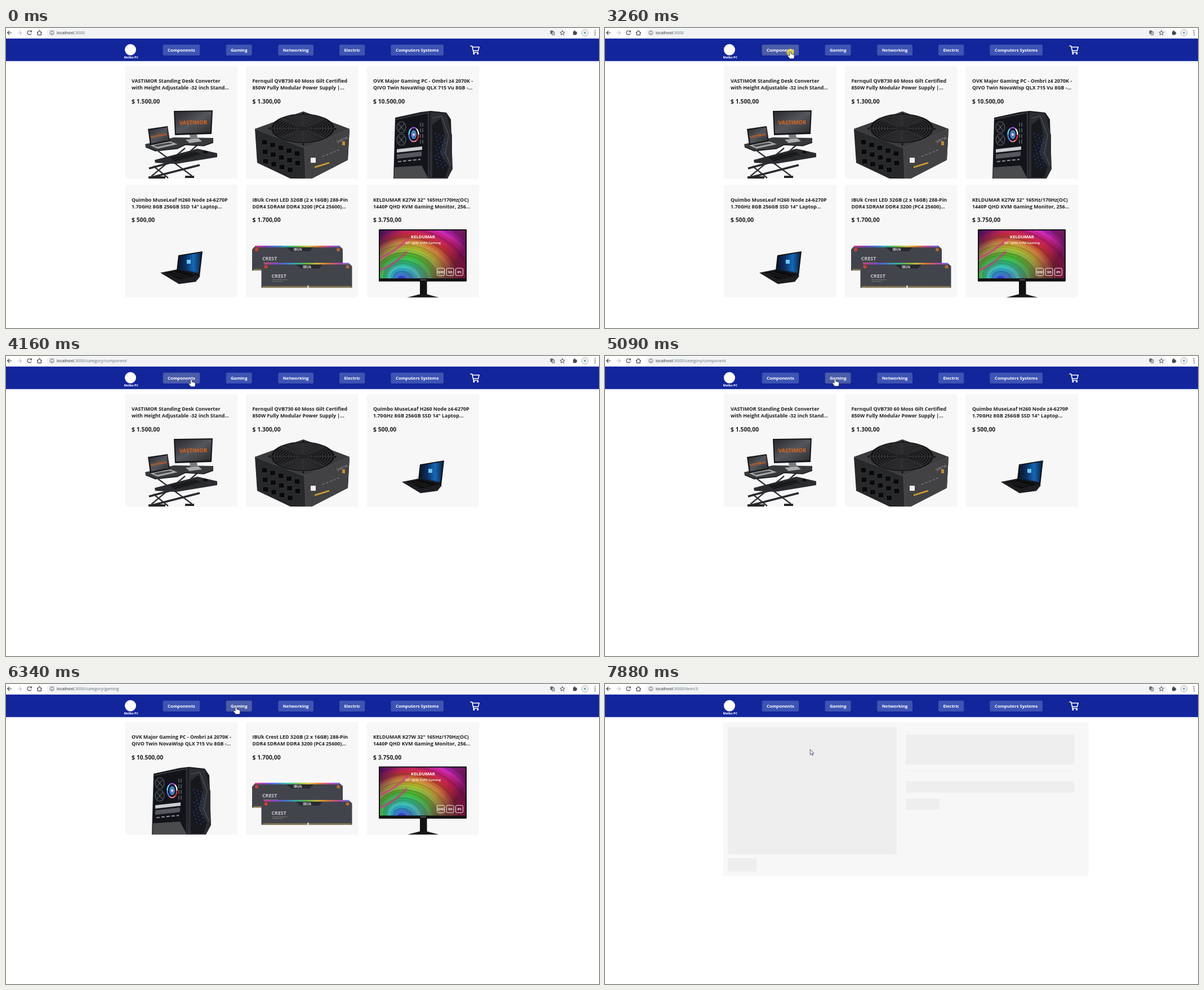
These frames come from a looping animation (1053x532 px, 8 s). An HTML page:

```html
<!DOCTYPE html>
<html lang="en">
<head>
<meta charset="utf-8">
<title>Shop demo</title>
<style>
html, body { margin: 0; width: 100%; height: 100%; overflow: hidden; background: #fff }
#stage { display: block; width: 1053px; height: 532px; font-family: "Open Sans", sans-serif }
.hover { filter: drop-shadow(0 1.5px 1.5px rgba(0, 0, 0, .2)) }
</style>
</head>
<body>
<svg id="stage" viewBox="0 0 1053 532"></svg>
<script>
const LOOP = 8000, SIZE = 199.5;
const stage = document.getElementById('stage');

// Markup helpers
const rect = (x, y, w, h, fill, r = 0, more = '') =>
  `<rect x="${x}" y="${y}" width="${w}" height="${h}" rx="${r}" fill="${fill}" ${more}/>`;
const shape = (d, fill, more = '') => `<path d="${d}" fill="${fill}" ${more}/>`;
const line = (d, color, w = 1, more = '') =>
  `<path d="${d}" fill="none" stroke="${color}" stroke-width="${w}" ${more}/>`;
const dot = (x, y, rx, fill, ry = rx, more = '') =>
  `<ellipse cx="${x}" cy="${y}" rx="${rx}" ry="${ry}" fill="${fill}" ${more}/>`;
const text = (x, y, s, size, fill, more = '') =>
  `<text x="${x}" y="${y}" font-size="${size}" fill="${fill}" ${more}>${s}</text>`;
const repeat = (n, f) => Array.from({ length: n }, (_, i) => f(i)).join('');
const gradient = (id, stops, more = '') => `<linearGradient id="${id}" ${more}>` +
  stops.map((c, i) => `<stop offset="${i / (stops.length - 1)}" stop-color="${c}"/>`).join('') +
  '</linearGradient>';
const bold = 'font-weight="700"', mid = 'text-anchor="middle"';

// Product pictures, each drawn where it sits on the home page
function desk() {
  const orange = '#e0651f', steel = '#333438';
  return line('M258 263L318 213M270 218L330 262M262 245L288 266M345 203L304 239', steel, 2.4) +
    line('M254 249L302 236M258 265L344 243', '#28292d', 3.6) +
    line('M253 265H283M318 264H334', '#242528', 4) +
    shape('M247 206L298 194L368 195V203L351 209L318 207L304 214L265 218L248 211Z', '#38393d') +
    line('M248 211L265 218L304 214L318 207L351 209L368 203', '#18191b', 1.5) +
    shape('M264 234L340 214L375 222V229L302 241L265 239Z', '#2b2c30') +
    shape('M290 229L336 219L346 224L300 236Z', '#111214') +
    line('M294 230L339 220M298 233L343 223', '#43454a', .7) +
    dot(354, 220, 4, '#0e0e10', 2.2) +
    shape('M326 189H339L341 200H328Z', '#77797c') + shape('M319 198L342 196L348 201L326 204Z', '#a9abad') +
    shape('M298 147L367 146L365 188L300 190Z', '#131417') +
    shape('M300 149L365 148L363 185L302 187Z', 'url(#slate)') +
    text(332.5, 171, 'VASTIMOR', 9.6, orange, `${bold} ${mid} transform="rotate(-1 332 170)"`) +
    shape('M252 179L287 174L291 201L256 208Z', '#131417') +
    shape('M254 181L286 176L289 199L258 205Z', 'url(#slate)') +
    text(271, 193, 'VASTIMOR', 5.6, orange, `${bold} ${mid} transform="rotate(-10 271 191)"`) +
    shape('M256 208L291 201L305 206L269 214Z', '#aaabad') + shape('M262 208L290 203L297 205L268 211Z', '#4a4b4e');
}

function powerSupply() {
  return shape('M442 179L528 148L610 179L607 234L543 267H505L446 239Z', '#27282a') +
    shape('M442 179L528 148L610 179L530 213Z', '#3a3b3d') +
    shape('M530 213L610 179L607 234L543 267H532Z', '#424244') +
    line('M442 179L530 213L610 179M530 213L532 267', '#555659', .8) +
    dot(527, 178, 56, '#161618', 26) +
    repeat(10, i => dot(527, 178, 6 + i * 5, 'none', 2.6 + i * 2.3, 'stroke="#4c4d50" stroke-width=".9"')) +
    line('M472 178H582M527 153V203M488 160L566 196M566 160L488 196', '#3d3e40', .9) +
    dot(527, 178, 9, '#222325', 4) +
    [[468, 178], [528, 152], [585, 179], [528, 206]].map(p => dot(...p, 1.8, '#0d0d0e')).join('') +
    repeat(14, i => {
      const row = i / 5 | 0, col = i % 5;
      return rect(454 + col * 14.5 + row, 198 + row * 17 + col * 5, 10, 9, '#09090a', 1,
        'stroke="#48494b" stroke-width=".6"');
    }) +
    text(588, 204, 'QVB730', 5.6, '#aaa', 'transform="rotate(-22 588 204)"') +
    rect(597, 201, 5, 7, '#c08b34') + rect(541, 230, 9, 9, '#eee') +
    line('M548 247L574 239', '#d3a02d', 2.6) + line('M562 228L592 216', '#999', 1, 'stroke-dasharray="4 3"');
}

function tower() {
  const ring = ['#e33', '#e8a', '#48f', '#6df', '#a5f', '#fff'];
  return shape('M691 159L737 149L754 147L782 150L790 162L793 250L784 267H688Z', '#1b1c20') +
    shape('M693 162L748 152L750 267H690Z', '#13141a') +
    shape('M754 149L782 152L792 190V250L783 267H752Z', '#2b2d33') +
    shape('M757 172L772 160L779 190L771 222L786 246L780 265H757Z', '#17181c') +
    line('M757 160L773 156L786 190L780 222L790 244', '#50535b', 1.2) +
    repeat(30, i => dot(762 + i * 7 % 19, 187 + i * 2.1, .9, '#2852d8')) +
    [176, 198].map(y => dot(702, y, 8, '#17191f', 10, 'stroke="#555b66" stroke-width="1.2"') +
      line(`M697 ${y - 6}L707 ${y + 6}M707 ${y - 6}L697 ${y + 6}`, '#777', 1)).join('') +
    line('M736 168V205M740 168V205', '#85898f', 1, 'stroke-dasharray="7 3"') +
    ring.map((c, i) => dot(724, 189, 8.5, 'none', 12.5,
      `stroke="${c}" stroke-width="2.2" pathLength="6" stroke-dasharray="1 5" stroke-dashoffset="${-i}"`)).join('') +
    dot(724, 189, 5, '#487bbd', 8) + dot(724, 189, 2.2, '#dce') +
    shape('M694 215L739 210V216L694 221Z', '#c9ccd0') + shape('M694 224L738 219V227L694 232Z', '#55585e') +
    line('M696 237L736 233', '#8d9198', 2, 'stroke-dasharray="6 3"') +
    shape('M690 247L738 244L750 267H689Z', '#4a4b4d') +
    line('M692 162L750 150V267', '#3b3d43', 1.4);
}

function laptop() {
  return shape('M274 434L304 428L345 440L337 450L307 454Z', '#1d1e21') +
    shape('M284 434L306 430L337 439L309 446Z', '#0c0c0e') +
    line('M288 435L318 443M295 433L325 441', '#37383c', .8) +
    shape('M306 403L349 396L344 440L303 430Z', '#101114') +
    shape('M308 405L347 398L342 436L305 428Z', 'url(#screen)') +
    rect(321, 411, 7, 7, '#6cc8f2') + line('M305 427L342 435', '#132338', 1.4);
}

function stick(x, y) {
  return shape(`M${x + 4} ${y + 2}H${x + 157}L${x + 161} ${y + 6}V${y + 44}H${x}V${y + 7}Z`, '#42444c') +
    shape(`M${x + 60} ${y + 2}H${x + 110}L${x + 102} ${y + 10}H${x + 70}Z`, '#282930') +
    rect(x + 5, y, 151, 2.8, 'url(#rainbow)') +
    line(`M${x + 3} ${y + 42.5}H${x + 159}`, '#b89a54', 2.4, 'stroke-dasharray="1.5 1"') +
    rect(x + 82, y + 40, 2, 5, '#f7f7f7') +
    dot(x + 8, y + 7, 3, '#d33d33') + dot(x + 153, y + 7, 3, '#b56835') +
    text(x + 81, y + 9, 'IBUk', 6.4, '#ddd', `${bold} ${mid}`) +
    text(x + 18, y + 26, 'CREST', 8.8, '#c4c5c8', bold) +
    line(`M${x + 20} ${y + 30}h26m-26 3h18`, '#888', 1, 'stroke-dasharray="3 1"');
}
const memory = () => stick(437, 386) + stick(453.5, 416.5);

function monitor() {
  const badge = (x, s) => rect(x, 426, 13, 13, 'none', 2, 'stroke="#fff" stroke-width=".9"') +
    text(x + 6.5, 434.5, s, 5, '#fff', `${bold} ${mid}`);
  // Bands fan out from the lower left: blue inside, then green, yellow, red and purple
  const bands = repeat(22, i => dot(702 + i, 446 - i * .6, 6 + i * 5.4, 'none', 5 + i * 4.3,
    `stroke="hsl(${225 - i * 14} 72% ${48 + 7 * Math.sin(i * 2)}%)" stroke-width="6.5" opacity=".8"`));
  return rect(735, 448, 12.5, 26, '#111') + shape('M735 472H747L769 478H712Z', '#17181a') +
    rect(662, 357, 156, 92.5, '#111214', 1) +
    '<svg x="664" y="359" width="152" height="85" viewBox="664 359 152 85">' +
    rect(664, 359, 152, 85, '#6b1c78') +
    `<g transform="rotate(14 702 446)">${bands}</g>` +
    rect(664, 359, 152, 85, 'url(#dusk)') +
    line('M664 408Q692 396 716 372M664 430Q690 420 712 396', '#d62f8c', 4, 'opacity=".6"') + '</svg>' +
    text(740.5, 373, 'KELDUMAR', 7.7, '#fff', `${bold} ${mid}`) +
    text(740.5, 382.5, '32&quot; QHD KVM Gaming', 6, '#fff', `font-weight="600" ${mid}`) +
    badge(765.5, 'QHD') + badge(782, '165') + badge(798.5, 'IPS') + rect(736, 446, 10, 1.2, '#777');
}

const products = [
  ['VASTIMOR Standing Desk Converter', 'with Height Adjustable -32 inch Stand...', '1.500,00', desk],
  ['Fernquil QVB730 60 Moss Gilt Certified', '850W Fully Modular Power Supply |...', '1.300,00', powerSupply],
  ['OVK Major Gaming PC - Ombri z4 2070K -', 'QIVO Twin NovaWisp QLX 715 Vu 8GB -...', '10.500,00', tower],
  ['Quimbo MuseLeaf H260 Node z4-6270P', '1.70GHz 8GB 256GB SSD 14&quot; Laptop...', '500,00', laptop],
  ['IBUk Crest LED 32GB (2 x 16GB) 288-Pin', 'DDR4 SDRAM DDR4 3200 (PC4 25600)...', '1.700,00', memory],
  ['KELDUMAR K27W 32&quot; 165Hz/170Hz(OC)', '1440P QHD KVM Gaming Monitor, 256...', '3.750,00', monitor]
];

const cardX = i => 211.5 + i % 3 * 214.5;
const cardY = i => i < 3 ? 67.5 : 278.3;

function card(id, slot) {
  const [first, second, price, draw] = products[id], x = cardX(slot), y = cardY(slot);
  return rect(x, y, SIZE, SIZE, '#f7f7f7', 2.5, 'class="card"') +
    text(x + 11.5, y + 29.2, first, 8.85, '#212121', bold) +
    text(x + 11.5, y + 41.5, second, 8.85, '#212121', bold) +
    text(x + 11.5, y + 66, '$ ' + price, 10.4, '#212121', bold) +
    `<svg x="${x}" y="${y}" width="${SIZE}" height="${SIZE}" viewBox="${cardX(id)} ${cardY(id)} ${SIZE} ${SIZE}">${draw()}</svg>`;
}

const grey = (x, y, w, h) => rect(x, y, w, h, '#eee', 1.5);
const blank = i => {
  const x = cardX(i), y = cardY(i);
  return rect(x, y, SIZE, SIZE, '#f7f7f7', 2.5) + grey(x + 11.5, y + 21.8, 177, 20) +
    grey(x + 11.5, y + 54.5, 71, 17.3) + grey(x + 11.5, y + 84, 177, 115.5);
};

const pages = {
  home: [0, 1, 2, 3, 4, 5].map(card).join(''),
  component: [0, 1, 3].map(card).join(''),
  gaming: [2, 4, 5].map(card).join(''),
  loading: repeat(6, blank),
  item: rect(210, 68, 648.5, 272.7, '#f7f7f7', 3) + grey(218.3, 77.5, 299.7, 224.5) + grey(534, 89.7, 299.5, 53) +
    rect(534, 153.6, 299.5, .8, '#e8e8e8') + grey(534, 172.4, 299.5, 20) + grey(534, 203, 60, 20) +
    grey(218.3, 309, 50.6, 23.4)
};

const buttons = [
  ['Components', 278.7, 65.5], ['Gaming', 390.7, 46], ['Networking', 483.3, 62.7],
  ['Electric', 592, 45.3], ['Computers Systems', 683.3, 93.7]
];

function browserBar() {
  const ink = '#45484c';
  return line('M10 8.5H2.8M6.2 5L2.7 8.5L6.2 12', ink, 1.2) +
    line('M20 8.5H27.2M23.8 5L27.3 8.5L23.8 12', '#c4c6c9', 1.2) +
    line('M44.5 6.2A3.6 3.6 0 1 0 45 9.6M45.3 4V7H42.2', ink, 1.2) +
    line('M55 8.8L59.3 4.6L63.6 8.8M56.3 8V12.4H62.3V8', ink, 1.2) +
    rect(72, 1, 926, 15, '#f1f3f4', 7.5) +
    dot(81.5, 8.5, 3.6, 'none', 3.6, `stroke="${ink}" stroke-width=".8"`) + line('M81.5 8V10.6M81.5 6.2V7.1', ink, .9) +
    `<text x="90" y="11.1" font-size="7.4" fill="#202124">localhost<tspan fill="#5f6b80">:3000<tspan id="path"></tspan></tspan></text>` +
    rect(966.5, 4.5, 5, 6, '#5f6368', .7) + rect(969.5, 6.5, 4.5, 6, '#b9bcc0', .7, `stroke="${ink}" stroke-width=".6"`) +
    line('M988 4.4L989.2 7.2L992.2 7.4L989.9 9.3L990.6 12.2L988 10.6L985.4 12.2L986.1 9.3L983.8 7.4L986.8 7.2Z', ink, .9) +
    rect(1007, 6.2, 6, 6, ink, .8) + dot(1009.6, 5.8, 1.4, ink) + dot(1013, 9, 1.4, ink) +
    dot(1028, 8.5, 5.7, '#f6f8f8', 5.7, 'stroke="#8a9296" stroke-width=".8"') + dot(1028, 8.5, 2, '#7fa3b0') +
    [5, 8.5, 12].map(y => dot(1046, y, .9, ink)).join('');
}

const navBar = () => rect(0, 18.7, 1053, 40, '#12259b') +
  dot(221, 38.5, 10, '#fff') + text(222.3, 54, 'Melbo PC', 5.6, '#fff', `${bold} ${mid}`) +
  buttons.map(([label, x, w]) => rect(x, 29.5, w, 19.2, '#3d54b3', 2.2, 'class="button"') +
    text(x + w / 2, 42.1, label, 7.72, '#fff', `${bold} ${mid}`)).join('') +
  line('M824.8 31.7H827.6L830.3 43.2H838.6M828.2 33.8H840.2L838.4 40.2H829.6', '#fff', 1.6,
    'stroke-linejoin="round" stroke-linecap="round"') +
  dot(830.9, 45.5, 1.6, '#fff') + dot(837.7, 45.5, 1.6, '#fff');

stage.innerHTML = '<defs>' +
  gradient('slate', ['#29292d', '#55565b', '#2b2b2f'], 'x2="1" y2="1"') +
  gradient('screen', ['#0a1424', '#0b2f63', '#1668b5', '#0a2346']) +
  gradient('rainbow', ['#d9407a', '#8a45c8', '#4576dd', '#35b7b0', '#6cc04b', '#d8c23c', '#e07a34', '#c946a8', '#5568d8']) +
  gradient('dusk', ['#1a0d45d0', '#64106430', '#c92b6200', '#b0184830', '#4a0a34b0'], 'x2="1" y2=".35"') + '</defs>' +
  Object.entries(pages).map(([name, body]) => `<g id="${name}">${body}</g>`).join('') +
  browserBar() + navBar() +
  '<g id="cursor">' + dot(0, 2, 6.5, '#f5e02f', 6.5, 'id="click" opacity=".78"') +
  shape('M0 0V9.6L2.2 7.6L3.7 11L5.3 10.3L3.8 7.1H6.8Z', '#fff', 'id="arrow" stroke="#2b2b5c" stroke-width=".8"') +
  shape('M-1.4 7.6V1.2Q0-.8 1.4 1.2V4.6Q2.8 4 3.6 5.2Q5 4.6 5.6 5.9Q7.2 5.5 7.2 7.2V9.5Q7 11.5 6 13H-.8Q-2.5 10.5-4.6 8.2Q-4.6 6.2-2.8 6.8Z',
    '#fff', 'id="hand" stroke="#26262c" stroke-width=".8"') + '</g>';

const el = id => document.getElementById(id);
const show = (id, on) => { el(id).style.display = on ? '' : 'none'; };

const views = [
  [0, 'home', ''], [3330, 'loading', '/category/component'], [4160, 'component', '/category/component'],
  [5430, 'loading', '/category/gaming'], [6340, 'gaming', '/category/gaming'], [7810, 'item', '/item/3']
];
// start, end, steps, target x, y, optional curve control x, y
const moves = [
  [440, 580, 3, 1036, 525], [840, 1240, 7, 599, 502, 830, 388], [1510, 1650, 3, 576, 429],
  [2000, 2760, 12, 329, 41.5], [4750, 5090, 6, 408.5, 40.5], [6870, 7280, 6, 364.3, 115.8]
];
const clicks = [[3260, 3330], [5370, 5430], [7740, 7810]];

function cursorAt(t) {
  let x = 1053, y = 533;
  for (const [from, to, steps, tx, ty, cx = (x + tx) / 2, cy = (y + ty) / 2] of moves) {
    if (t < from) break;
    const k = Math.floor((t - from) / (to - from) * (steps - 1) + 1e-6) + 1;
    const p = Math.min(1, k / steps), q = 1 - p;
    x = q * q * x + 2 * p * q * cx + p * p * tx;
    y = q * q * y + 2 * p * q * cy + p * p * ty;
  }
  return [x, y];
}

function draw(now) {
  const t = now % LOOP, [x, y] = cursorAt(t);
  const [, page, path] = views.findLast(v => t >= v[0]);
  let over = false;
  const inside = (bx, by, w, h) => t > 1300 && x > bx && x < bx + w && y > by && y < by + h;

  for (const name in pages) show(name, name === page);
  if (el('path').textContent !== path) el('path').textContent = path;
  el(page).querySelectorAll('.card').forEach((c, i) => {
    const on = inside(cardX(i), cardY(i), SIZE, SIZE);
    c.classList.toggle('hover', on);
    over ||= on;
  });
  stage.querySelectorAll('.button').forEach((b, i) => {
    const on = inside(buttons[i][1], 29.5, buttons[i][2], 19.2);
    b.setAttribute('fill', on ? '#4b5ca9' : '#3d54b3');
    over ||= on;
  });

  const hand = over && t >= 1850;
  show('cursor', t >= 440);
  show('hand', hand);
  show('arrow', !hand);
  show('click', clicks.some(([a, b]) => t >= a && t < b));
  el('cursor').setAttribute('transform', `translate(${x} ${y})`);
}

function tick() {
  draw(performance.now());
  requestAnimationFrame(tick);
}
tick();
</script>
</body>
</html>
```
